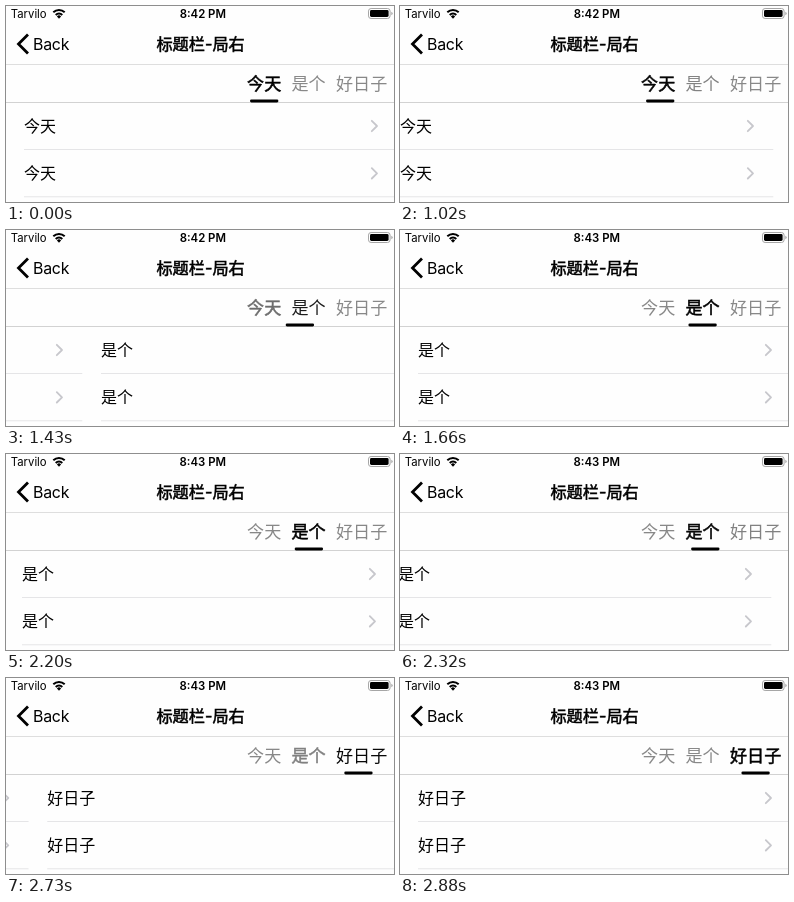
An HTML page that plays this animation: 388 by 196 pixels, repeating every 3880 ms.

```html
<!DOCTYPE html>
<html lang="zh-CN">
<head>
<meta charset="utf-8">
<title>标题栏</title>
<style>
html, body { margin: 0; width: 100%; height: 100%; overflow: hidden; background: #fefefe; }
svg { display: block; width: 100%; height: 100%; }
text { font-family: Inter, "Noto Sans CJK SC", "Noto Sans CJK", sans-serif; }
.zh { font-family: "Noto Sans CJK SC", "Noto Sans CJK", sans-serif; }
.mid { text-anchor: middle; }
.bold { font-weight: 600; }
.semi { stroke: currentColor; stroke-width: .5; }
.line { fill: none; stroke-linecap: round; stroke-linejoin: round; }
</style>
</head>
<body>
<svg viewBox="0 0 388 196">
  <rect width="388" height="196" fill="#fefefe"/>
  <g id="pages"></g>

  <text x="4.8" y="12" font-size="11.3">Tarvilo</text>
  <g class="line" stroke="#000" stroke-width="2" style="stroke-linecap:butt">
    <path d="M47.3 6.3a8.2 8.2 0 0 1 11.4 0"/>
    <path d="M49.7 8.9a4.8 4.8 0 0 1 6.6 0"/>
  </g>
  <path d="M53 12.7l-2.1-2.3a3 3 0 0 1 4.2 0z"/>
  <text id="clock" class="mid bold" x="196.8" y="12" font-size="11.4"></text>
  <rect x="362.5" y="2.5" width="21.6" height="10" rx="2.6" fill="none" stroke="#a6a6a6"/>
  <rect x="364" y="4.1" width="18.6" height="6.8" rx="1.4"/>
  <path d="M385.3 5.8q1.4.4 1.4 1.7t-1.4 1.7z" fill="#a6a6a6"/>

  <path class="line" d="M21 29.5L12.5 38l8.5 8.5" stroke="#000" stroke-width="2.8" style="stroke-linecap:square;stroke-linejoin:miter"/>
  <text x="27" y="43.8" font-size="15.9" letter-spacing="-.25">Back</text>
  <text class="mid semi" x="194.6" y="44" font-size="16.2">标题栏-局右</text>
  <path d="M0 58.5h388" stroke="#dedede"/>

  <g id="tabs"></g>
  <path d="M0 96.5h388" stroke="#d2d2d2"/>
  <rect id="bar" y="93.5" width="28.4" height="3" rx="1.4"/>
</svg>
<script>
const LOOP = 3880, PAGE = 392, GRAY = 136, TAU = 80;
const labels = ['今天', '是个', '好日子'];
const centers = [258.2, 302.6, 355.6];
const $ = id => document.getElementById(id);

// Each swipe: a short drag in held steps, then a decaying glide to the next page.
const swipes = [
  { drag: [[1020, 18], [1080, 40]], glide: [1320, 1360, 1400, 1430, 1450, 1490, 1540, 1600, 1660], at: 1430, left: 77 },
  { drag: [[2200, 2], [2260, 10], [2320, 20]], glide: [2550, 2610, 2670, 2720, 2770, 2820, 2880], at: 2610, left: 92 }
];

function make(tag, attrs, parent, text = '') {
  const el = document.createElementNS('http://www.w3.org/2000/svg', tag);
  for (const k in attrs) el.setAttribute(k, attrs[k]);
  el.textContent = text;
  return parent.appendChild(el);
}

labels.forEach((label, i) => {
  const page = make('g', { transform: `translate(${i * PAGE})` }, $('pages'));
  for (const y of [120, 167.3]) {
    make('text', { class: 'zh', x: 18, y: y + 6, 'font-size': 16 }, page, label);
    make('path', { class: 'line', d: `M365.8 ${y - 5.2}l5.2 5.2l-5.2 5.2`, stroke: '#c7c7cc', 'stroke-width': 1.8 }, page);
    make('path', { d: `M18 ${y + 23.5}H391.3`, stroke: '#e5e5e7' }, page);
  }
});

const tabs = labels.map((label, i) =>
  make('text', { x: centers[i], y: 83.9, 'font-size': 17.1, fill: 'currentColor' }, $('tabs'), label));

function swipeOffset({ drag, glide, at, left }, t) {
  const end = glide[glide.length - 1];
  if (t >= end) return PAGE;
  const step = glide.filter(s => s <= t).pop();
  if (step) return PAGE - left * Math.exp((at - step) / TAU);
  const held = drag.filter(([s]) => s <= t).pop();
  return held ? held[1] : 0;
}

function draw(t) {
  const offset = swipes.reduce((sum, s) => sum + swipeOffset(s, t), 0);
  const pos = offset / PAGE, from = Math.floor(pos), part = pos - from;
  const next = Math.min(from + 1, labels.length - 1);

  $('pages').setAttribute('transform', `translate(${-offset})`);
  $('bar').setAttribute('x', centers[from] + (centers[next] - centers[from]) * part - 14.2);
  $('clock').textContent = t < 1540 ? '8:42 PM' : '8:43 PM';
  tabs.forEach((tab, i) => {
    const c = Math.round(GRAY * Math.min(1, Math.abs(pos - i)));
    tab.setAttribute('color', `rgb(${c},${c},${c})`);
    tab.setAttribute('class', i === from ? 'zh mid semi' : 'zh mid');
  });
}

const start = performance.now();
function tick() {
  draw((performance.now() - start) % LOOP);
  requestAnimationFrame(tick);
}
tick();
</script>
</body>
</html>
```
